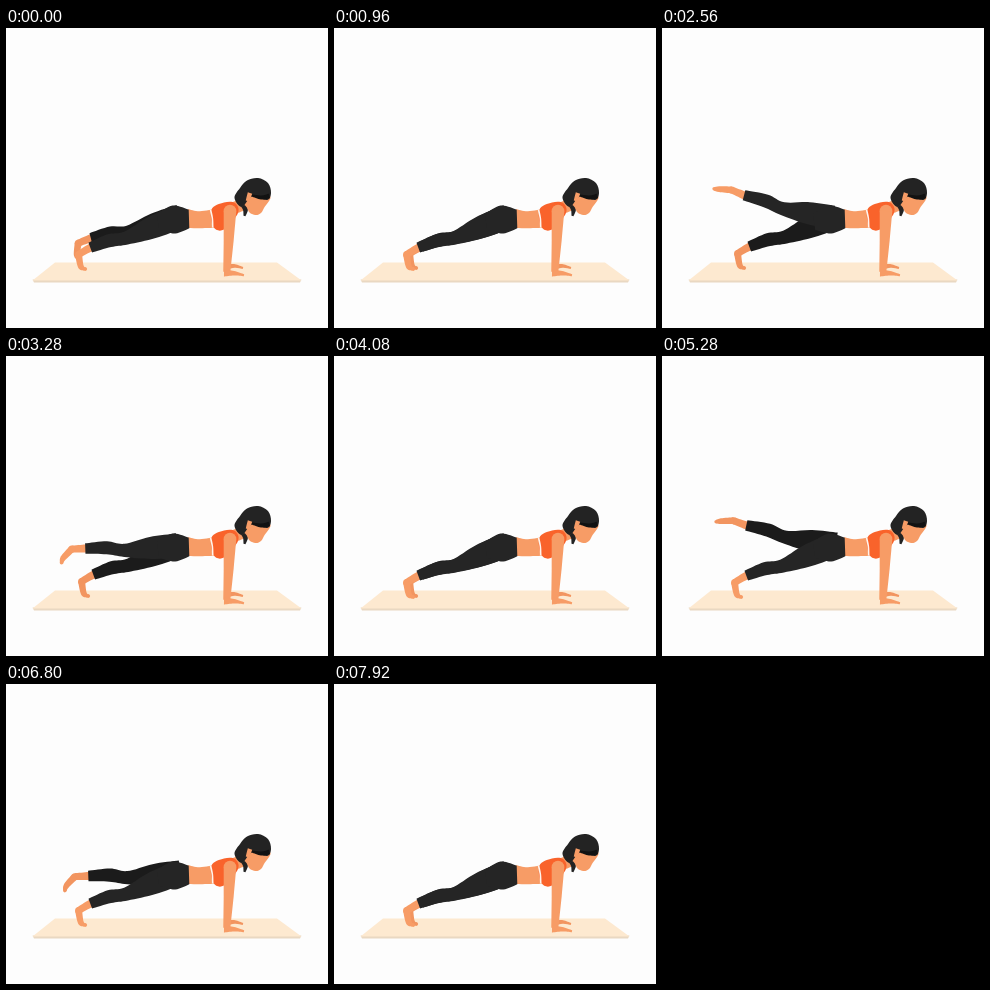
An HTML page with a canvas for the animation above (8000 ms loop, 322 by 300 pixels).

```html
<!DOCTYPE html>
<html lang="en">
<head>
<meta charset="utf-8">
<title>Plank leg raise</title>
<style>
html, body { margin: 0; width: 100%; height: 100%; overflow: hidden; background: #fdfdfd; }
canvas { display: block; width: 322px; height: 300px; }
</style>
</head>
<body>
<canvas id="stage"></canvas>
<script>
const LOOP = 8000, W = 322, H = 300;
const SKIN = '#f79c66', SHADE = '#f29560', PANTS = '#252525', DARK = '#1b1b1b';
const HAIR = '#232323', TOP = '#f9632b';

const canvas = document.getElementById('stage');
const ctx = canvas.getContext('2d');
const dpr = window.devicePixelRatio || 1;
canvas.width = W * dpr;
canvas.height = H * dpr;

const clamp = u => Math.max(0, Math.min(1, u));
const smooth = u => u * u * (3 - 2 * u);
const ease = (t, from, to, power = 1) => smooth(clamp((t - from) / (to - from)) ** power);
const mix = (a, b, u) => [a[0] + (b[0] - a[0]) * u, a[1] + (b[1] - a[1]) * u];

// Steps left from p, turned down by deg
function step([x, y], deg, len) {
  const a = deg * Math.PI / 180;
  return [x - len * Math.cos(a), y + len * Math.sin(a)];
}

// Smooth curve through the points
function curve(pts, closed) {
  const n = pts.length;
  const at = i => pts[closed ? (i + n) % n : Math.max(0, Math.min(n - 1, i))];
  for (let i = 0; i < (closed ? n : n - 1); i++) {
    const [a, b, c, d] = [at(i - 1), at(i), at(i + 1), at(i + 2)];
    ctx.bezierCurveTo(b[0] + (c[0] - a[0]) / 6, b[1] + (c[1] - a[1]) / 6,
      c[0] - (d[0] - b[0]) / 6, c[1] - (d[1] - b[1]) / 6, c[0], c[1]);
  }
}

function blob(color, ...pts) {
  ctx.fillStyle = color;
  ctx.beginPath();
  ctx.moveTo(...pts[0]);
  curve(pts, true);
  ctx.fill();
}

function poly(color, ...pts) {
  ctx.fillStyle = color;
  ctx.beginPath();
  pts.forEach(p => ctx.lineTo(...p));
  ctx.fill();
}

function disc(color, p, r) {
  ctx.fillStyle = color;
  ctx.beginPath();
  ctx.arc(...p, r, 0, 7);
  ctx.fill();
}

// Tapered tube along a line, with half widths
function limb(color, pts, widths) {
  const side = s => pts.map((p, i) => {
    const a = pts[Math.max(0, i - 1)], b = pts[Math.min(pts.length - 1, i + 1)];
    const dx = b[0] - a[0], dy = b[1] - a[1], k = s * widths[i] / Math.hypot(dx, dy);
    return [p[0] - dy * k, p[1] + dx * k];
  });
  const left = side(1), right = side(-1).reverse();
  ctx.fillStyle = color;
  ctx.beginPath();
  ctx.moveTo(...left[0]);
  curve(left);
  ctx.lineTo(...right[0]);
  curve(right);
  ctx.fill();
}

// Every joint turns evenly with the lift, 0 on the floor to 1 at the top
function leg(hip, lift, skin, cloth) {
  const shin = 15 - 35 * lift, sole = 101 - 108 * lift;
  const knee = step(hip, 22 - 33 * lift, 55 - 4 * lift);
  const ankle = step(knee, shin, 37 + 4 * lift);
  const heel = step(ankle, 30 - 55 * lift, 13.5);
  const ball = step(heel, sole, 12.5);
  const toe = step(ball, sole + 50 * (1 - lift), 5);
  const calf = step(mix(knee, ankle, 0.45), shin - 90, 1.8);

  limb(skin, [mix(knee, ankle, 0.95), ankle, heel], [4.3, 4, 3.4]);
  disc(skin, heel, 3.5);
  limb(skin, [heel, ball, toe], [3.5, 2.9, 1.8]);
  disc(skin, toe, 1.8);
  limb(cloth, [hip, mix(hip, knee, 0.5), knee, calf, ankle], [12, 11, 6.6, 6.6, 5.2]);
}

function mat() {
  poly('#e9d8c2', [26.5, 251.5], [295.5, 251.5], [294, 254.5], [28, 254.5]);
  poly('#fde9d0', [49, 234.5], [271, 234.5], [295.5, 252.5], [26.5, 252.5]);
}

function head() {
  limb(SKIN, [[228, 180], [243, 174]], [6, 6.5]);
  limb(HAIR, [[237, 178], [239.5, 182], [238.5, 188]], [2, 2.4, 1]);
  blob(SKIN, [242, 166], [264, 168], [258, 180], [255, 185], [249, 187], [242, 182]);
  blob(HAIR, [228.5, 170], [234, 160], [241, 152.5], [252, 150], [262, 155], [265, 165],
    [261, 172], [246, 168.5], [236, 179]);
  limb('#121212', [[246, 167.5], [255, 169.5], [263.5, 168]], [1, 2, 2.2]);
  limb(SKIN, [[244, 165], [241.5, 173]], [2.3, 1.8]);
}

function body() {
  limb(SHADE, [[221, 239], [229, 238], [237, 240]], [2.5, 1.8, 1]);
  limb(SKIN, [[181, 190.5], [194, 191.7], [212, 190]], [9.6, 8.5, 9.5]);
  limb(PANTS, [[152, 194], [168, 191.5], [183, 191]], [8, 14, 9.3]);
  head();
  blob(TOP, [205.5, 181.5], [218, 174.5], [229, 175], [232, 185], [218, 201.5], [207.5, 199]);
  limb('#fff4ec', [[204.5, 181.5], [206.3, 190], [206.8, 199.5]], [0.8, 0.8, 0.8]);
  disc(SKIN, [224, 183], 6.3);
  limb(SKIN, [[224, 183], [222.7, 212], [220.8, 244]], [6.3, 5, 3.5]);
  limb(SKIN, [[218, 245], [228, 245.2], [238, 247.2]], [3.4, 2.2, 1]);
}

function draw(t) {
  ctx.setTransform(dpr, 0, 0, dpr, 0, 0);
  ctx.fillStyle = '#fdfdfd';
  ctx.fillRect(0, 0, W, H);
  const landing = 0.16 * (1 - ease(t, 0, 260));
  const far = ease(t, 4200, 5520) * (1 - ease(t, 6240, 7860, 0.65));
  const near = ease(t, 1100, 2140) * (1 - ease(t, 2300, 4060, 1.2));
  mat();
  leg([174, 188.5], landing + far, SHADE, DARK);
  leg([171, 189.5], near, SKIN, PANTS);
  body();
}

const start = performance.now();
function tick() {
  draw((performance.now() - start) % LOOP);
  requestAnimationFrame(tick);
}
tick();
</script>
</body>
</html>
```
